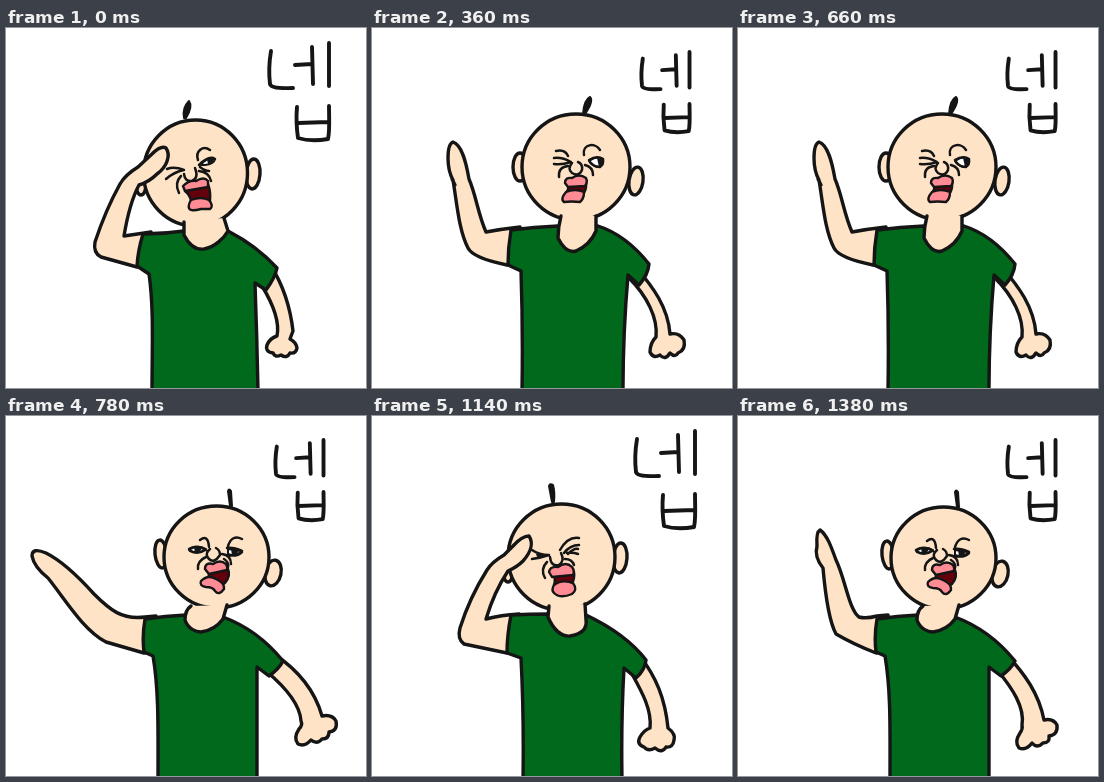
Write an HTML page that moves like this. It is 360 by 360 pixels and loops after 1.44 s.

```html
<!DOCTYPE html>
<html lang="ko">
<head>
<meta charset="utf-8">
<title>Salute</title>
<style>
html, body { margin: 0; width: 100%; height: 100%; overflow: hidden; background: #fff; }
svg { display: block; width: 100vw; height: 100vh; }
path, ellipse { stroke: #151515; stroke-width: 3.4; stroke-linecap: round; stroke-linejoin: round; }
.skin { fill: #fee3c7; }
.line { fill: none; stroke-width: 2.5; }
.eye { fill: #fff; stroke-width: 2; }
.dot { fill: #151515; stroke: none; }
.lip { fill: #ff8b95; stroke-width: 2.4; }
.mouth { fill: #64000b; stroke-width: 2.4; }
.shirt { fill: #00691b; }
.hair { fill: #151515; stroke-width: 2; }
.word { fill: none; stroke-width: 3.9; vector-effect: non-scaling-stroke; }
</style>
</head>
<body>
<svg id="stage" viewBox="0 0 360 360"></svg>
<script>
const STEP = 60;
const ORDER = "ADECBADFCBADFECBDECBADEC";
const WORD = "M265 23C263 35 263 48 264 56Q265 61 287 60 M289 37L306 36 M306 19L307 56 M323 15L323 58" +
  " M291 79C290 90 291 103 292 110Q305 114 322 111C324 102 323 90 323 78 M292 95L322 94";

const poses = {
  A: {
    big: true,
    head: [189.5, 145, 52, 53],
    earL: [135, 157, 5, 10, 0], earR: [247, 146, 7, 15, 4],
    hair: "M178 90Q176 80 183 73Q187 78 180 90Z",
    lines: "M161 141Q168 138 178 142Q168 144 160 151 M192 132C189 123 197 117 204 122" +
      " M193 137Q203 127 209 131 M178 146Q179 154 186 153Q193 150 189 140 M175 148Q168 155 173 165" +
      " M193 143Q203 144 205 153 M194 139Q199 143 203 143",
    eye: "M195 137Q201 129 209 131Q208 136 199 137Z", dot: "M201 131L208 131Q207 136 202 136Z",
    lips: "M177 158Q183 152 190 153Q198 148 202 153L202 159L179 163Z" +
      " M185 172Q195 168 203 172Q208 178 204 181L195 181Q184 184 183 180Q182 177 185 172Z",
    mouth: "M181 158Q193 155 202 156Q205 164 204 173Q194 169 185 173Q184 167 179 163Z",
    armL: "M145 204L118 208C121 190 126 170 133 157Q143 154 151 146C161 139 165 127 160 120" +
      "Q155 117 146 126L132 139Q119 147 114 156C104 174 95 196 89 214Q87 225 95 229L131 239L150 236Z",
    armR: "M265 238C277 257 284 277 287 303L284 311Q290 314 291 320Q290 326 284 325Q281 331 275 327" +
      "Q269 330 267 325Q259 324 261 317Q264 310 271 308C274 293 267 276 256 258Z",
    shirt: "M178 203Q157 206 137 206Q132 222 131 238L143 246C148 280 146 320 146 363L252 363" +
      "Q251 310 249 255L260 262Q269 250 271 240Q251 218 222 203Z",
    neck: "M178 194L178 207C183 217 190 222 198 221C209 219 218 210 222 203L218 190"
  },
  B: {
    big: true,
    head: [189.5, 141, 53.5, 53],
    earL: [136, 156, 5, 10, 0], earR: [248, 142, 7, 15, 4],
    hair: "M180 86L177 70Q178 67 181 69Q183 76 182 86Z",
    lines: "M160 134Q167 139 177 139Q168 142 160 143 M188 134Q196 120 207 122" +
      " M192 137Q198 129 207 129 M196 138Q202 132 206 133 M195 137Q201 136 206 138" +
      " M178 141Q179 151 187 149Q193 145 189 137 M175 146Q168 153 173 162 M193 143Q200 143 202 149",
    eye: "", dot: "M164 138L175 138L166 143Z",
    lips: "M177 156Q178 150 186 151Q194 145 200 151Q203 155 201 159L180 161Z" +
      " M182 169Q190 163 201 167Q206 174 200 178Q188 183 182 177Q179 174 182 169Z",
    mouth: "M181 157Q193 153 202 156Q203 162 200 168Q190 164 182 169Q184 163 181 157Z",
    armL: "M147 198Q129 199 114 203C120 183 128 167 136 155Q145 151 151 145C160 135 161 126 157 120" +
      "Q150 120 141 130L132 139Q120 146 115 154C103 173 94 193 88 212Q85 223 92 228L135 237L152 235Z",
    armR: "M268 240C284 261 293 282 296 312Q304 318 302 324Q301 332 294 331Q290 338 283 332" +
      "Q276 336 272 331Q264 328 268 321Q272 314 278 312C280 294 270 276 260 258Z",
    shirt: "M177 198Q157 198 139 199Q135 219 135 237L149 242Q152 300 151 363L250 363" +
      "Q249 305 252 252L264 262Q273 254 274 244Q254 218 214 199Z",
    neck: "M177 190L176 201C181 213 189 221 198 220Q216 217 214 204L213 188"
  },
  C: {
    head: [205.5, 142, 52.5, 51],
    earL: [150, 139, 6, 14, -6], earR: [262, 158, 8, 13, 12],
    hair: "M219 91L217 76Q218 73 220 76L221 91Z",
    lines: "M189 125Q197 119 198 132 M217 131Q221 119 231 124 M178 134Q185 129 195 135" +
      " M179 136Q187 140 194 135 M216 133Q222 132 231 136 M217 140Q226 142 231 137" +
      " M199 134Q193 139 198 144Q203 149 209 140Q209 135 205 133 M195 142Q186 146 187 154" +
      " M211 139Q220 140 220 149 M213 144Q218 147 217 152",
    eye: "M178 135Q186 129 195 134Q187 140 178 135Z M217 134L231 136Q225 142 217 139Z",
    dot: "M183 132L190 132Q191 138 184 138Z M220 134L228 135Q227 140 221 140Z",
    lips: "M194 154Q194 147 202 149Q209 144 215 149Q217 152 216 155L198 159Z" +
      " M190 166Q197 159 205 164Q214 168 213 174Q208 181 204 176Q202 172 195 172Q188 171 190 166Z",
    mouth: "M195 155Q207 151 217 154Q220 161 214 168Q209 172 205 165Q200 161 195 164Q201 160 195 155Z",
    armL: "M150 199L139 200Q128 203 121 201C111 194 107 162 98 144C93 130 89 119 82 114" +
      "Q78 116 79 130Q76 141 85 152C87 175 91 205 98 218Q115 228 138 237L153 234Z",
    armR: "M268 238C287 258 301 278 306 304Q315 302 319 309Q320 319 311 320Q312 327 305 327" +
      "Q299 333 294 327Q288 335 281 332Q276 326 282 317Q285 313 284 309C287 291 274 272 260 255Z",
    shirt: "M180 199Q159 200 139 203Q136 220 138 236L147 240C153 275 152 315 152 363L251 363" +
      "L251 251L263 260Q273 253 277 245Q252 214 217 201Z",
    neck: "M185 190Q179 194 179 204C182 213 190 216 195 216Q209 214 217 203L221 189"
  },
  D: {
    head: [204, 139, 54, 53],
    earL: [148, 139, 7, 14, 0], earR: [264, 153, 7, 14, 8],
    hair: "M211 86Q212 72 218 69Q222 73 213 86Z",
    lines: "M184 123Q193 121 196 128 M182 130Q190 129 199 134Q190 137 182 136" +
      " M212 127C210 116 223 114 228 122 M217 132Q225 127 231 131Q232 138 227 139 M218 134Q222 139 228 139" +
      " M200 135Q195 141 200 145Q207 149 210 142Q211 136 206 134 M196 138Q186 139 187 149" +
      " M213 137Q221 139 221 147",
    eye: "M217 133Q225 127 231 131Q231 138 226 139Q220 138 217 133Z", dot: "M225 130L231 131Q231 138 227 139Z",
    lips: "M193 155Q193 149 200 150Q207 145 214 150Q216 154 213 158L196 159Z" +
      " M194 164Q203 160 212 164Q212 171 208 174Q199 173 192 174Q188 171 194 164Z",
    mouth: "M195 154Q205 151 214 153Q215 160 212 165Q202 160 194 165Q198 160 195 154Z",
    armL: "M148 199Q130 201 114 204C106 186 104 167 97 151C94 134 90 117 81 114" +
      "Q76 116 76 130Q76 143 81 152C85 176 87 203 96 220Q101 230 135 237L152 235Z M80 151L83 157",
    armR: "M263 238C281 259 296 279 298 306Q307 304 312 312Q314 322 306 325Q303 330 298 325" +
      "Q293 333 288 327Q281 331 278 324Q278 315 284 309C286 290 275 268 257 250Z",
    shirt: "M186 198Q162 199 139 202Q136 220 136 237L149 243Q151 300 150 363L251 363" +
      "Q251 305 256 247L267 257Q276 247 277 236Q254 207 226 198Z",
    neck: "M189 188Q186 199 186 210C191 220 197 225 204 223Q218 217 224 203L224 188"
  }
};

const wideArm = "M150 200L139 201C116 204 104 194 88 178C70 158 56 145 40 137Q26 131 26 140" +
  "Q28 151 42 162C59 183 77 214 100 226L138 237L153 234Z";
const wideHand = "M268 238C292 254 309 275 316 300Q326 298 330 305Q332 315 323 316Q323 323 316 323" +
  "Q311 329 305 324Q299 331 292 328Q287 322 293 313Q297 309 295 305C294 288 278 270 260 255Z";
poses.E = { ...poses.C, armL: wideArm, armR: wideHand, nudge: [5, -1] };
poses.F = { ...poses.E, nudge: [7, 1], swing: 3 };

const stage = document.getElementById("stage");
function add(tag, cls, parent = stage) {
  const el = document.createElementNS("http://www.w3.org/2000/svg", tag);
  if (cls) el.setAttribute("class", cls);
  return parent.appendChild(el);
}
function set(el, attrs) {
  for (const key in attrs) el.setAttribute(key, attrs[key]);
}
function oval(el, [cx, cy, rx, ry, turn = 0]) {
  set(el, { cx, cy, rx, ry, transform: `rotate(${turn} ${cx} ${cy})` });
}

const top3 = add("g");
const ovals = {}, paths = {};
for (const name of ["earL", "earR", "head"]) ovals[name] = add("ellipse", "skin", top3);
const layers = [["hair", "hair"], ["eye", "eye"], ["dot", "dot"], ["lines", "line"],
  ["mouth", "mouth"], ["lips", "lip"]];
for (const [name, cls] of layers) paths[name] = add("path", cls, top3);
for (const [name, cls] of [["armL", "skin"], ["armR", "skin"], ["shirt", "shirt"], ["neck", "skin"]])
  paths[name] = add("path", cls);
const word = add("path", "word");
set(word, { d: WORD });

let shown = "";
function draw(time) {
  const key = ORDER[Math.floor(time / STEP) % ORDER.length];
  if (key === shown) return;
  shown = key;
  const pose = poses[key];
  for (const name in ovals) oval(ovals[name], pose[name]);
  for (const name in paths) set(paths[name], { d: pose[name] });
  set(top3, { transform: `translate(${pose.nudge || [0, 0]})` });
  set(paths.armR, { transform: `translate(${pose.swing || 0} 0)` });
  set(word, { transform: pose.big ? "" : "translate(57.5 11.6) scale(.805 .825)" });
}

const start = performance.now();
function tick() {
  draw(performance.now() - start);
  requestAnimationFrame(tick);
}
draw(0);
requestAnimationFrame(tick);
</script>
</body>
</html>
```
